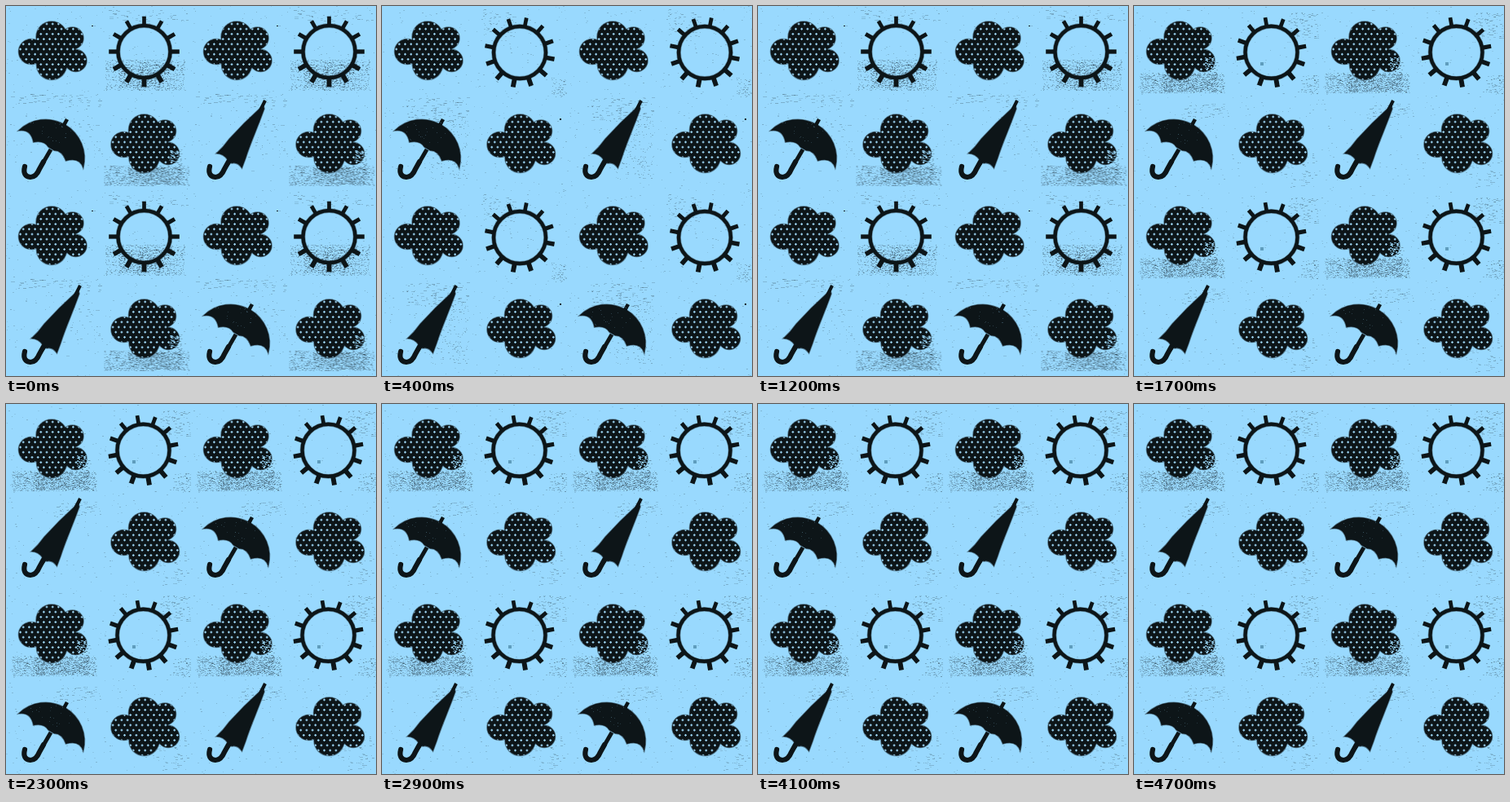
Write an HTML page with a canvas that moves like this. It is 454x454 px and loops after 4.8 s.

```html
<!DOCTYPE html>
<html lang="en">
<head>
<meta charset="utf-8">
<title>Weather pattern</title>
<style>
  html, body { margin: 0; width: 100%; height: 100%; overflow: hidden; background: #99d9fe; }
  canvas { display: block; width: 454px; height: 454px; }
</style>
</head>
<body>
<canvas id="stage" width="454" height="454"></canvas>
<script>
const TILE = 227, STEP = 100, FRAMES = 48;
const SKY = '#99d9fe', INK = '#0d1518';

const CLOUD = [[31, 56, 15.5], [56, 38, 19], [81.5, 39.5, 13.5], [85.5, 67, 13.5], [56, 72, 18.5], [60, 55, 25]];
const CANOPY = new Path2D('M-46 0A47.7 47.7 0 0 1 46 0Q35 -10 23 3Q13 -6 4 -1L-4 -1Q-13 -6 -23 3Q-34 -10 -46 0Z');
const FOLDED = new Path2D('M88.5 121L90 126C83 146 73 168 67 187L62.5 199Q57 191 50 193L45 189Q40 181 31 181Q40 173 47 163Q65 143 84 126Z');
const HANDLE = new Path2D('M46 191L41 200Q37 210 30 210Q20 209 23 197');
const SUNS = [{ x: 169.5, y: 56, turn: 0 }, { x: 169, y: 57, turn: 11 }, { x: 168.5, y: 56.8, turn: 20 }];

let seed;
function rnd() {
  seed = (seed + 0x6D2B79F5) | 0;
  let n = Math.imul(seed ^ (seed >>> 15), 1 | seed);
  n ^= n + Math.imul(n ^ (n >>> 7), 61 | n);
  return ((n ^ (n >>> 14)) >>> 0) / 4294967296;
}

// Random grains in a box; bias > 1 gathers them near the top.
function grit(c, x, y, w, h, count, { color = INK, alpha = 0.25, len = 2, bias = 1 } = {}) {
  c.fillStyle = color;
  for (let i = 0; i < count; i++) {
    c.globalAlpha = alpha * (0.4 + 0.6 * rnd());
    c.fillRect(Math.floor(x + w * rnd()), Math.floor(y + h * rnd() ** bias), 1 + Math.floor(len * rnd()), 1);
  }
  c.globalAlpha = 1;
}

function line(c, path, width) {
  c.strokeStyle = INK;
  c.lineWidth = width;
  c.stroke(path);
}

// Ink shape with a soft outline.
function stamp(c, path) {
  c.fillStyle = INK;
  c.fill(path);
  c.globalAlpha = 0.5;
  line(c, path, 1.6);
  c.globalAlpha = 1;
}

function segment(c, x1, y1, x2, y2, width) {
  const p = new Path2D();
  p.moveTo(x1, y1);
  p.lineTo(x2, y2);
  line(c, p, width);
}

function cloud(c, dx, dy, smudged) {
  c.save();
  c.translate(dx, dy);
  if (smudged) {
    grit(c, 7, 82, 104, 25, 900);
    grit(c, 36, 84, 66, 21, 600, { bias: 1.2 });
    grit(c, 80, 62, 22, 20, 70, { alpha: 0.45 });
  }
  const shape = new Path2D();
  for (const [x, y, r] of CLOUD) {
    const puff = new Path2D();
    puff.arc(x, y, r, 0, Math.PI * 2);
    stamp(c, puff);
    shape.addPath(puff);
  }
  c.clip(shape);
  c.fillStyle = '#9bd2f0';
  for (let row = 0; row < 12; row++) {
    for (let col = 0; col < 13; col++) {
      const x = 14 + col * 7.2 + (row % 2) * 3.6, y = 22 + row * 6.2;
      c.fillRect(x - 1.4, y - 0.6, 2.8, 1.2);
      c.fillRect(x - 0.6, y - 1.4, 1.2, 2.8);
    }
  }
  if (smudged) grit(c, 87, 63, 14, 14, 80, { color: SKY, alpha: 0.8 });
  c.restore();
}

function sun(c, { x, y, turn }) {
  c.save();
  c.translate(x, y);
  const ring = new Path2D();
  ring.arc(0, 0, 32, 0, Math.PI * 2);
  line(c, ring, 4.4);
  c.globalAlpha = 0.35;
  line(c, ring, 5.8);
  c.globalAlpha = 1;
  for (let i = 0; i < 12; i++) {
    const a = (i * 30 + turn) * Math.PI / 180;
    const s = Math.sin(a), k = -Math.cos(a);
    segment(c, s * 33, k * 33, s * 43.3, k * 43.3, 5.3 + 0.6 * k);
  }
  c.restore();
}

function umbrella(c, open) {
  c.lineCap = 'round';
  line(c, HANDLE, 6.2);
  c.lineCap = 'butt';
  if (open) {
    segment(c, 55, 176, 44, 195, 5);
    segment(c, 70, 148, 75, 139, 4.6);
    c.save();
    c.translate(55, 176);
    c.rotate(Math.PI / 6);
    stamp(c, CANOPY);
    c.restore();
    grit(c, 30, 142, 50, 28, 25, { color: SKY, len: 1 });
  } else {
    segment(c, 52, 184, 44, 195, 5.2);
    segment(c, 91, 116, 85, 128, 4);
    stamp(c, FOLDED);
  }
}

function backdrop(c, boil) {
  c.fillStyle = SKY;
  c.fillRect(0, 0, TILE, TILE);
  grit(c, 0, 0, TILE, TILE, 320, { alpha: 0.2 });
  if (boil === 0) {
    grit(c, 122, 66, 98, 38, 800);
    grit(c, 138, 72, 64, 28, 400, { alpha: 0.35 });
    grit(c, 125, 5, 98, 14, 45, { len: 5 });
    grit(c, 5, 108, 110, 12, 50, { len: 5 });
    grit(c, 66, 118, 50, 70, 45, { len: 3 });
    c.fillStyle = INK;
    c.fillRect(105, 24, 2, 1);
  } else if (boil === 1) {
    grit(c, 124, 4, 40, 36, 60, { len: 3 });
    grit(c, 208, 88, 18, 24, 60);
    grit(c, 30, 112, 75, 30, 110, { len: 4 });
    grit(c, 60, 140, 45, 72, 160);
    c.fillStyle = INK;
    c.fillRect(218, 138, 2, 2);
  } else {
    grit(c, 190, 8, 36, 32, 100, { len: 3 });
    grit(c, 205, 85, 22, 24, 80);
    grit(c, 185, 180, 40, 42, 45, { len: 4 });
    grit(c, 62, 120, 48, 18, 45, { len: 4 });
    c.fillStyle = '#5f9dbd';
    c.fillRect(155, 69, 4, 4);
  }
}

function makeTile(boil, open) {
  const tile = document.createElement('canvas');
  tile.width = tile.height = TILE;
  const c = tile.getContext('2d');
  seed = 71 + boil * 997;
  backdrop(c, boil);
  cloud(c, 0, 0, boil === 2);
  cloud(c, 113.5, 114, boil === 0);
  sun(c, SUNS[boil]);
  umbrella(c, open);
  return tile;
}

const tiles = [0, 1, 2].map(boil => [makeTile(boil, false), makeTile(boil, true)]);
const stage = document.getElementById('stage').getContext('2d');

function draw(now) {
  const frame = Math.floor(now / STEP) % FRAMES;
  const swap = Math.floor(frame / 6) % 2;
  for (let row = 0; row < 2; row++) {
    for (let col = 0; col < 2; col++) {
      const open = (row + col + swap) % 2 === 0;
      stage.drawImage(tiles[frame % 3][+open], col * TILE, row * TILE);
    }
  }
}

const start = performance.now();
function tick() {
  draw(performance.now() - start);
  requestAnimationFrame(tick);
}
tick();
</script>
</body>
</html>
```
